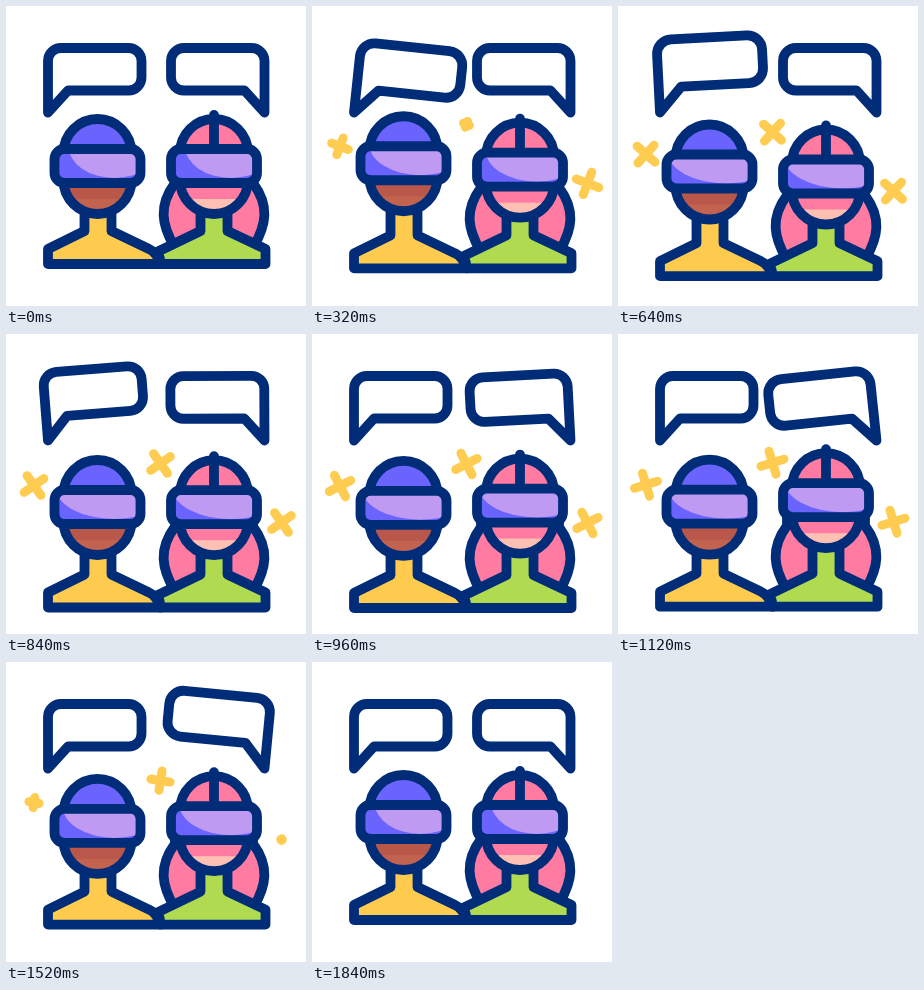
An HTML page that plays this animation: 300x300 px, repeating every 1960 ms.

```html
<!DOCTYPE html>
<html lang="en">
<head>
<meta charset="utf-8">
<title>VR chat</title>
<style>
  html, body { margin: 0; width: 100%; height: 100%; overflow: hidden; background: #fff; }
  svg { display: block; width: 100vw; height: 100vh; }
  .line { stroke: #002c78; stroke-width: 9.800; stroke-linecap: round; stroke-linejoin: round; }
  .bubble { fill: #fff; vector-effect: non-scaling-stroke; }
  .spark { stroke: #ffcc52; stroke-width: 9; stroke-linecap: round; fill: none; }
</style>
</head>
<body>
<svg viewBox="0 0 300 300">
  <defs>
    <clipPath id="skull"><rect x="-34" y="113" width="68" height="95" rx="34"/></clipPath>
    <clipPath id="visor"><rect x="-43" y="143" width="86" height="34" rx="10"/></clipPath>
    <path id="bubble" class="line bubble" d="M0 0V-51.500A13 13 0 0 1 13-64.500H80.500A13 13 0 0 1 93.500-51.500V-35A13 13 0 0 1 80.500-22H20Z"/>
  </defs>
  <g id="bubbles"></g>
  <g id="people">
    <path class="line" fill="#ff7ba1" d="M169 160V177C152 200 156 219 168 240H248C260 219 264 200 247 177V160Z"/>
    <g class="line">
      <path fill="#b0da50" d="M154 258Q155 252 151 246L194.500 225V192H221.500V225L259.500 243V258Z"/>
      <path fill="#ffcb4e" d="M42 258V243L78.500 225V192H105.500V225L143 243Q150 246 155 258Z"/>
    </g>
  </g>
  <g id="sparks"></g>
</svg>
<script>
const $ = id => document.getElementById(id);
const MOVE = 1840, LOOP = 1960, STEP = 40, DELAY = 800;
const clamp = x => Math.max(0, Math.min(1, x));
const smooth = x => (x = clamp(x), x * x * (3 - 2 * x));

function add(parent, html) {
  parent.insertAdjacentHTML('beforeend', html);
  return parent.lastElementChild;
}

// time, angle, scale of a talking bubble
const talk = [[0, 0, 1], [320, 6, 1.1], [480, 3.5, 1.15], [600, -2, 1.14],
              [720, -5.5, 1.08], [840, -4.5, 1.05], [960, 0, 1]];

function pose(t) {
  const i = talk.findIndex(k => k[0] > t);
  if (t <= 0 || i < 0) return [0, 1];
  const a = talk[i - 1], b = talk[i];
  const u = smooth((t - a[0]) / (b[0] - a[0]));
  return [1, 2].map(n => a[n] + (b[n] - a[n]) * u);
}

function makeHead({ x, cap, shade, skin, parting }) {
  const g = add($('people'), `<g>
    <g clip-path="url(#skull)">
      <rect x="-40" y="108" width="80" height="60" fill="${cap}"/>
      <rect x="-40" y="160" width="80" height="34" fill="${shade}"/>
      <rect x="-40" y="193" width="80" height="20" fill="${skin}"/>
    </g>
    <rect class="line" x="-34" y="113" width="68" height="95" rx="34" fill="none"/>
    ${parting ? '<path class="line" d="M0 109V140"/>' : ''}
    <g clip-path="url(#visor)">
      <rect x="-43" y="143" width="86" height="34" fill="#6b63fd"/>
      <ellipse class="sheen" cx="17" cy="140" rx="46" ry="32" fill="#be9af3"/>
    </g>
    <rect class="line" x="-43" y="143" width="86" height="34" rx="10" fill="none"/>
  </g>`);
  return { x, g, sheen: g.querySelector('.sheen') };
}

const heads = [
  { x: 91.5, cap: '#6b63fd', shade: '#b9574a', skin: '#c26350' },
  { x: 208, cap: '#ff7ba1', shade: '#ff7ba1', skin: '#ffc0b4', parting: true }
].map(makeHead);

const bubbles = [0, 1].map(() => add($('bubbles'), '<use href="#bubble"/>'));

// x, y, grow start/end, shrink start/end
const sparks = [
  [28, 136, 80, 440, 1300, 1700],
  [154.5, 114, 240, 480, 1420, 1780],
  [275.5, 173, 40, 300, 1200, 1580]
].map(s => ({ s, el: add($('sparks'), '<path class="spark"/>') }));

function draw(t) {
  const wave = smooth(t / 940) - smooth((t - 970) / 850);
  const bob = 16 * wave;
  $('people').setAttribute('transform', `translate(0 ${bob})`);

  heads.forEach((h, i) => {
    const local = t - i * DELAY;
    // heads sink less than shoulders and rise while talking
    const lift = -2.2 * wave - 8 * Math.sin(Math.PI * clamp(local / 900)) ** 2;
    h.g.setAttribute('transform', `translate(${h.x} ${lift})`);
    h.sheen.setAttribute('rx', 46 + 13 * Math.min(1, 1.6 * wave));

    const [angle, scale] = pose(local);
    const place = i ? 'translate(258.500 106.500) scale(-1 1)' : 'translate(42 106.500)';
    bubbles[i].setAttribute('transform', `${place} rotate(${angle}) scale(${scale})`);
  });

  for (const { s: [x, y, in0, in1, out0, out1], el } of sparks) {
    const arm = 12 * smooth((t - in0) / (in1 - in0)) * (1 - smooth((t - out0) / (out1 - out0)));
    el.setAttribute('visibility', t > in0 && t <= out1 + STEP ? 'visible' : 'hidden');
    el.setAttribute('d', `M${-arm} 0L${arm + .01} 0M0 ${-arm}L0 ${arm + .01}`);
    el.setAttribute('transform', `translate(${x} ${y + bob}) rotate(${t * 120 / MOVE})`);
  }
}

const start = performance.now();
function tick() {
  const t = (performance.now() - start) % LOOP;
  draw(Math.min(MOVE, Math.floor(t / STEP) * STEP));
  requestAnimationFrame(tick);
}
tick();
</script>
</body>
</html>
```
